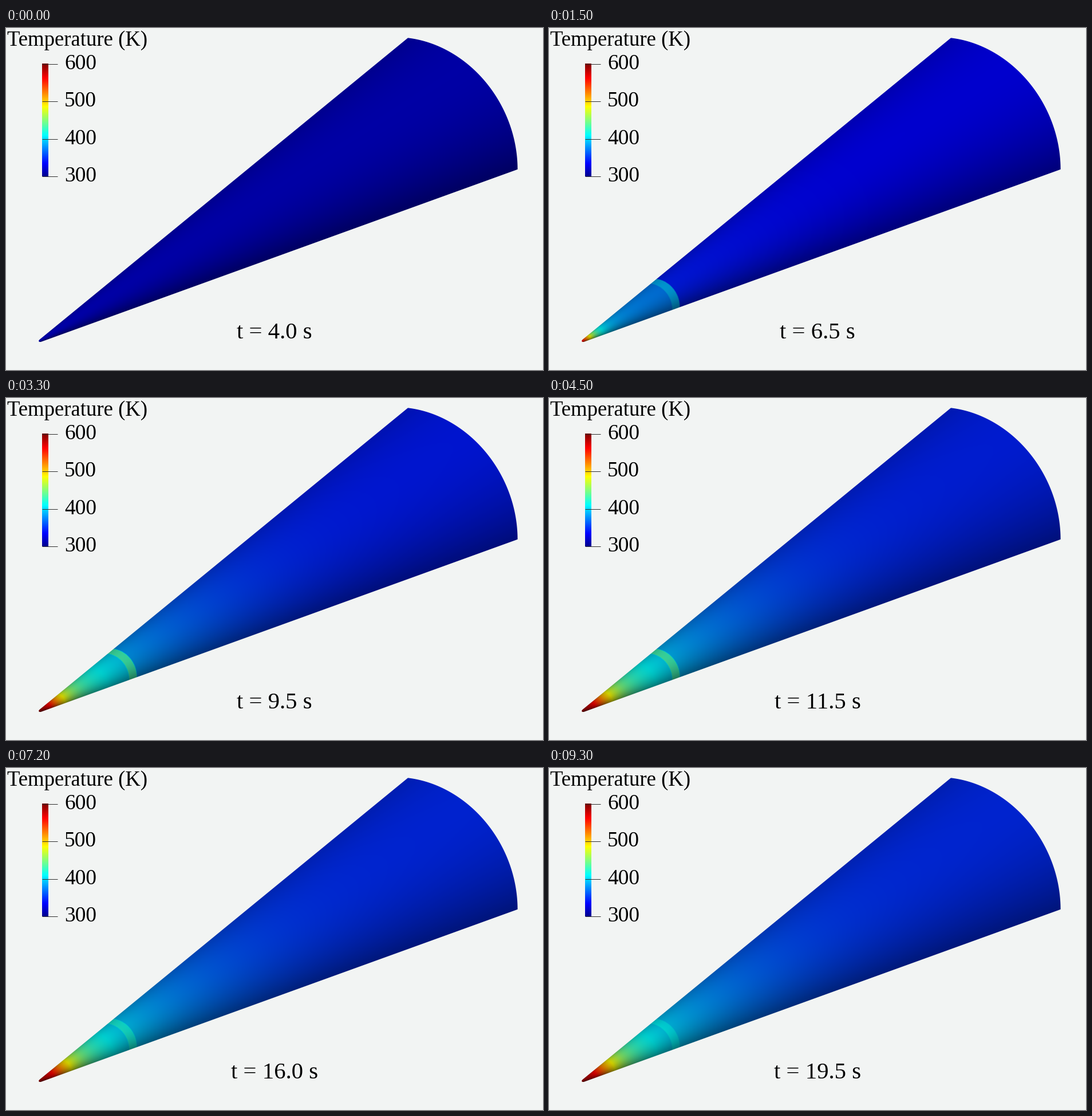
Write a matplotlib script that moves like this. It is 938x597 px and loops after 9600 ms.

```python
import numpy as np
import matplotlib.pyplot as plt
from matplotlib.animation import FuncAnimation
from matplotlib.patches import Polygon

W, H, DPI = 938, 597, 64
FRAMES, STEP = 32, 300
T_START, T_STEP = 4, .5
PX = 72 / DPI

# Quarter cone: virtual apex and the three points that span the base ellipse
APEX = np.array([50, 551.0])
TOP = np.array([702, 17.3])
LOW = np.array([893.6, 246.8])
CORNER = np.array([893.6, 40])
BASE = TOP + LOW - CORNER
U, V = LOW - BASE, TOP - BASE
RING_IN, RING_OUT = .196, .2115
LIGHT = 57


def jet(v):
    """Classic blue-to-red ramp as RGB in 0..1."""
    u = (np.clip(v, 0, 1) - .111) / .254
    bands = [np.minimum(u - 1, 4 - u), np.minimum(u, 3 - u),
             np.minimum(u + 1, 2 - u)]
    return np.clip(np.stack(bands, axis=-1), 0, 1)


def cone_coords():
    """Distance along the cone and angle around it for every pixel."""
    x, y = np.meshgrid(np.arange(W) + .5, np.arange(H) + .5)
    basis = np.linalg.inv(np.column_stack([U, V]))
    q1, q2 = np.tensordot(basis, np.stack([x - APEX[0], y - APEX[1]]), 1)
    d1, d2 = basis @ (BASE - APEX)
    a = d1 * d1 + d2 * d2 - 1
    b = q1 * d1 + q2 * d2
    c = q1 * q1 + q2 * q2
    s = (b - np.sqrt(np.maximum(b * b - a * c, 0))) / a
    angle = np.degrees(np.arctan2(q2 - s * d2, q1 - s * d1))
    return np.clip(s, 0, 1), np.clip(angle, 0, 90)


def rise(age, span, power=1):
    return 1 - np.exp(-(age / span) ** power)


def pulse(age, peak):
    return age / peak * np.exp(1 - age / peak)


def step_down(s, edge):
    return np.clip((edge - s) / .002 + .5, 0, 1)


def heat(s, age):
    """Normalised temperature at distance s after some heating time."""
    ambient = .06 + .095 * rise(age, 3.4)
    body = .17 * rise(age, 4, 3) * np.exp(-(s / .38) ** 2)
    reach = .072 * rise(age, 4, 1.3) + 1e-4
    tip = .66 / (1 + (s / reach) ** 2.6)
    inner = step_down(s, RING_IN)
    ring = step_down(s, RING_OUT) - inner
    return (ambient + body + tip + .1 * pulse(age, 2) * inner
            + .165 * pulse(age, 4) * ring)


along, angle = cone_coords()
shade = .81 * (.1 + .9 * np.cos(np.radians(angle - LIGHT)))[..., None]
grid = np.linspace(0, 1, 3001)
index = np.rint(along * 3000).astype(int)


def surface(age):
    return jet(heat(grid, age))[index] * shade


fig = plt.figure(figsize=(W / DPI, H / DPI), dpi=DPI, facecolor="#f2f4f3")
ax = fig.add_axes([0, 0, 1, 1])


def label(x, y, text, size, **kw):
    return ax.text(x, y, text, fontsize=size * PX, family="Liberation Serif",
                   color="black", va="baseline", **kw)


def picture(rgb, extent):
    return ax.imshow(rgb, extent=extent, interpolation="nearest",
                     aspect="auto")


# Cone
phi = np.radians(np.linspace(0, 90, 80))[:, None]
rim = BASE + np.cos(phi) * U + np.sin(phi) * V
nose = [(58.5, 544), (57.3, 545.4), (57.3, 547.2), (58.6, 548), (61, 547.9)]
cone = picture(surface(0), (0, W, H, 0))
cone.set_clip_path(Polygon(np.vstack([rim, nose]), transform=ax.transData))

# Colour scale
BAR_TOP, BAR_LOW = 62, 259
picture(jet(np.linspace(1, 0, 197))[:, None], (63, 74, BAR_LOW, BAR_TOP))
for k in range(4):
    y = round(BAR_TOP + k * 65.4) + 1
    ax.plot([63, 90], [y, y], color="#303030", lw=PX, solid_capstyle="butt")
    label(102, y + 9, str(600 - 100 * k), 37.5)

label(1.5, 30.5, "Temperature (K)", 36.7)
clock = label(469, 542, "", 40.8, ha="center")

ax.set_xlim(0, W)
ax.set_ylim(H, 0)
ax.axis("off")


def update(i):
    age = i * T_STEP
    cone.set_data(surface(age))
    clock.set_text(f"t = {T_START + age:.1f} s")
    return cone, clock


anim = FuncAnimation(fig, update, frames=FRAMES, interval=STEP, repeat=True,
                     repeat_delay=0, blit=False)
plt.show()
```
